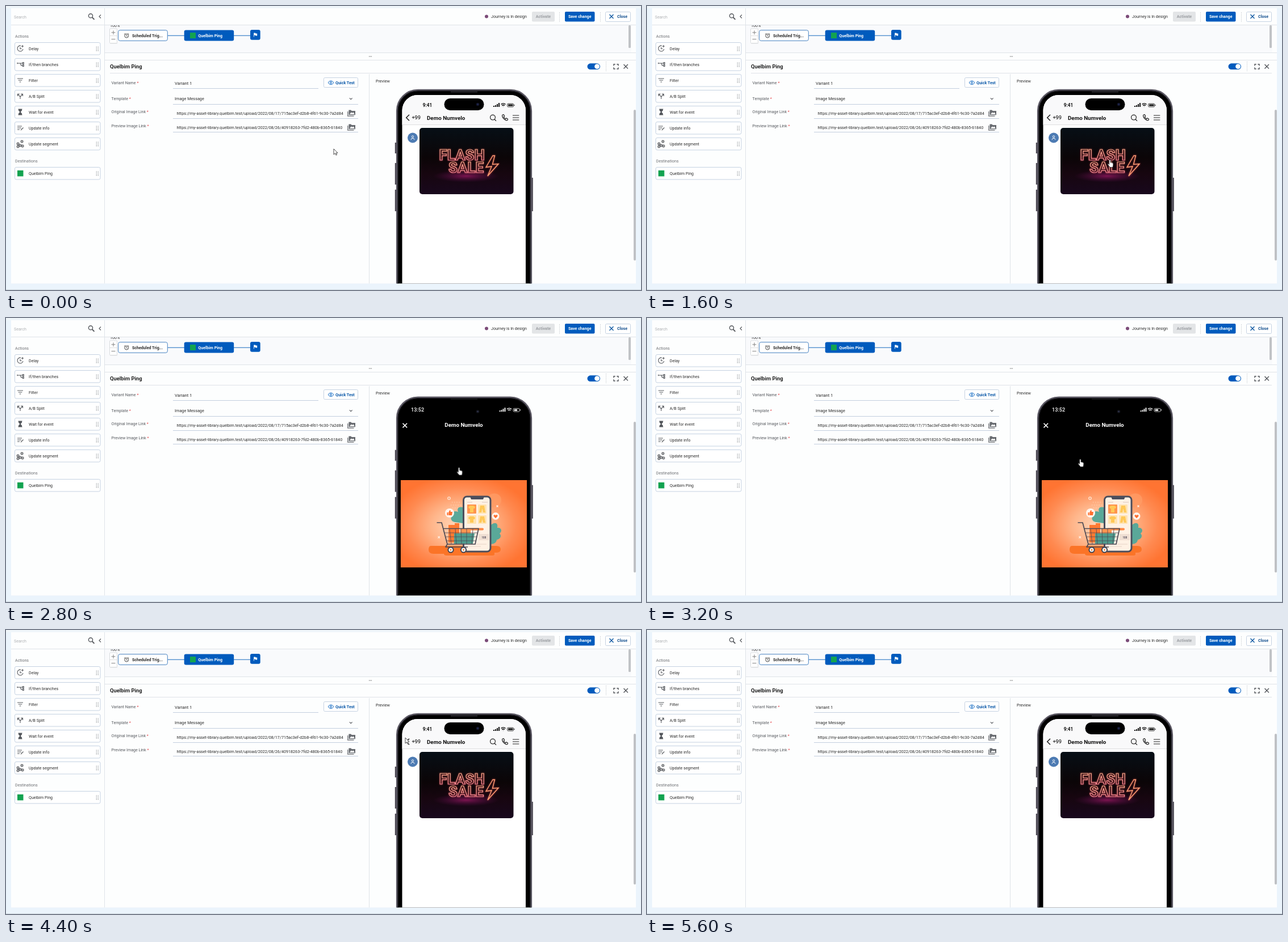
Recreate the animation shown at these times as an HTML page. Size 1118 px wide and 501 px high, loop 6 s.

```html
<!DOCTYPE html>
<html lang="en">
<head>
<meta charset="utf-8">
<title>Journey editor</title>
<style>
html, body { margin: 0; width: 100%; height: 100%; overflow: hidden; background: #ebf4fc; }
svg { display: block; width: 1118px; height: 501px; }
text { font: 7.1px Roboto, sans-serif; fill: #2b2b2b; white-space: pre; }
.b { font-weight: 700; }
.w { fill: #fff; }
.mute { fill: #6d6f73; }
.lab { fill: #56595e; }
.req { fill: #e5484d; }
.url { font-size: 7.2px; }
.title { font-size: 9.4px; font-weight: 700; fill: #222; }
.name { font-size: 9.8px; font-weight: 700; fill: #111; }
.line { fill: none; stroke: #dfe3e8; }
.field { fill: none; stroke: #c3cedf; }
.ico { fill: none; stroke: #55585d; stroke-width: 1.1; }
.box { fill: #fff; stroke: #c5d2e2; }
.blue { fill: #005bbd; }
.sep { stroke: #b9bdc3; stroke-dasharray: 1 1.6; }
.neon { font-size: 26px; font-weight: 700; fill: none; stroke: url(#neon); stroke-width: 1.2; }
.glow { filter: drop-shadow(0 0 1.5px #c8434a); }

.chat { animation: chat 6s step-end infinite; }
.viewer { animation: viewer 6s step-end infinite; }
.cursor { animation: move 6s infinite; }
.arrow { animation: arrow 6s step-end infinite; }
.hand { animation: hand 6s step-end infinite; }
@keyframes chat { 0%, 73.33% { visibility: visible } 33.33% { visibility: hidden } }
@keyframes viewer { 0%, 73.33% { visibility: hidden } 33.33% { visibility: visible } }
@keyframes arrow { 0%, 73.33% { visibility: visible } 13.33%, 93.33% { visibility: hidden } }
@keyframes hand { 0%, 73.33% { visibility: hidden } 13.33% { visibility: visible } }
@keyframes move {
  0% { transform: translate(577px, 252px); animation-timing-function: steps(6) }
  19.99% { transform: translate(811px, 270px); animation-timing-function: steps(2) }
  26.66%, 43.33% { transform: translate(815px, 271px); animation-timing-function: steps(3) }
  53.33% { transform: translate(763px, 249px); animation-timing-function: steps(3) }
  63.33% { transform: translate(703px, 191px); animation-timing-function: step-end }
  66.66% { transform: translate(703px, 190px); animation-timing-function: step-end }
  73.33% { transform: translate(703px, 190px); animation-timing-function: steps(5) }
  89.99%, 100% { transform: translate(604px, 232px) }
}
</style>
</head>
<body>
<svg viewBox="0 0 1118 501">
<defs>
  <linearGradient id="neon" x1="0" y1="0" x2="0" y2="1">
    <stop offset="0" stop-color="#ffc08e"/><stop offset="1" stop-color="#ff7f9c"/>
  </linearGradient>
  <linearGradient id="night" x1="0" y1="0" x2="0" y2="1">
    <stop offset="0" stop-color="#070f16"/><stop offset=".45" stop-color="#0b0507"/>
    <stop offset=".7" stop-color="#170610"/><stop offset="1" stop-color="#18081d"/>
  </linearGradient>
  <radialGradient id="floor">
    <stop offset="0" stop-color="#7d1450"/><stop offset="1" stop-color="#4a0c40" stop-opacity="0"/>
  </radialGradient>
  <radialGradient id="sun" cx=".48" cy=".52" r=".58">
    <stop offset="0" stop-color="#ffdcc2"/><stop offset=".4" stop-color="#ffb68b"/>
    <stop offset=".75" stop-color="#ff8a51"/><stop offset="1" stop-color="#ff7432"/>
  </radialGradient>
  <clipPath id="page"><rect x="640" y="120" width="460" height="369.5"/></clipPath>
  <clipPath id="strip"><rect x="174" y="34" width="927" height="48"/></clipPath>
  <clipPath id="url"><rect x="296" y="180" width="301.5" height="42"/></clipPath>
  <g id="shell">
    <path d="M686 241v19M686 277v38M686 324v38M926.6 303v59" stroke="#4c4953" stroke-width="2.4"/>
    <rect x="688.2" y="148" width="236.6" height="420" rx="37" stroke="#5b5863" stroke-width="2.6"/>
    <rect x="690.4" y="150.2" width="232.2" height="416" rx="35" fill="none" stroke="#1d1c22"/>
  </g>
  <g id="status">
    <path d="M1 3V1M4 3V0M7 3V-2M10 3V-4" stroke="currentColor" stroke-width="2"/>
    <path d="M13.5 -1.5a6 6 0 0 1 8 0M15.2 .7a3.4 3.4 0 0 1 4.6 0M17.5 2.6v.3" fill="none" stroke="currentColor" stroke-width="1.5"/>
    <rect x="24.6" y="-2.8" width="11" height="5.8" rx="1.6" fill="none" stroke="currentColor" stroke-width=".8"/>
    <path d="M37 -1v2" stroke="currentColor"/>
  </g>
  <g id="media">
    <path d="M-6.3 -3V5.2H4.5" fill="none" stroke="#686b70" stroke-width="1.2"/>
    <path d="M-4.6 -5.5h4l1.2 1.4H7V3.2H-4.6Z" fill="#686b70"/>
    <path d="M-3 2 0 -1.7 1.6 .2 3.2 -1.8 5.8 2Z" fill="#fff"/>
  </g>
</defs>

<rect width="1118" height="4" fill="#f0f6fa"/>
<rect x="9" y="4" width="1100" height="485.5" fill="#fdfefe"/>
<path d="M0 500.5H1118" stroke="#cfd9df"/>
<path class="line" d="M9 33.5H1109M173.5 4V489.5"/>

<text x="14" y="21.5" style="fill:#aeb0b3">Search</text>
<g class="ico">
  <circle cx="149" cy="17.3" r="3.6" stroke-width="1.4"/><path d="M151.7 20 155.5 23.8" stroke-width="1.8"/>
  <path d="M167 15.5 164 18.5 167 21.5"/>
</g>
<text class="mute" x="16" y="55.5">Actions</text>
<text class="mute" x="16" y="275.5">Destinations</text>
<g id="list"></g>

<!-- top bar -->
<circle cx="846" cy="18.5" r="3" fill="#7b4b78"/>
<text x="854" y="21.3">Journey is In design</text>
<rect x="926" y="10" width="40" height="17.5" rx="2" fill="#e3e5e7"/>
<text class="b" x="946" y="21.3" text-anchor="middle" style="fill:#9b9ea2">Activate</text>
<path class="sep" d="M974.5 11V28M1046.5 11V28M1056.5 98V115"/>
<rect class="blue" x="984" y="10" width="52.5" height="17.5" rx="2"/>
<text class="b w" x="1010.2" y="21.3" text-anchor="middle">Save change</text>
<rect class="box" x="1055.5" y="10.5" width="44" height="17" rx="2"/>
<path d="M1062.5 15l7 7M1069.5 15l-7 7" stroke="#00529f" stroke-width="1.3"/>
<text class="b" x="1076" y="21.3" style="fill:#14508f">Close</text>

<!-- flow strip -->
<rect x="174" y="34" width="927" height="48" fill="#f9fafc"/>
<g clip-path="url(#strip)"><text x="183" y="37.3">100%</text></g>
<rect x="183" y="40.5" width="13" height="26" rx="1" fill="#ddd"/>
<rect x="182.5" y="40" width="13" height="25.5" rx="1" fill="#fff" stroke="#d9dcdf"/>
<path d="M185.5 46.8h7M189 43.3v7M185.5 58.5h7" stroke="#777" stroke-width=".9"/>
<path d="M183 52.5h12" stroke="#ddd"/>
<path d="M285 52.2H430" stroke="#1567bd"/>
<rect x="197.7" y="42.7" width="86.6" height="18.6" rx="3" fill="#fff" stroke="#4581c0"/>
<g class="ico" style="stroke:#333;stroke-width:.9">
  <circle cx="212.3" cy="52.6" r="3.4"/>
  <path d="M212.3 50.5v2.3l1.4 .8M208.2 50l2-1.9M216.4 50l-2-1.9"/>
</g>
<text class="b" x="222" y="54.8">Scheduled Trig...</text>
<rect class="blue" x="313.7" y="42.4" width="87.5" height="19.2" rx="3"/>
<rect x="324" y="47" width="10" height="10" fill="#13a350"/>
<text class="b w" x="338.3" y="54.8">Quelbim Ping</text>
<rect class="blue" x="430" y="42" width="17.7" height="17.7" rx="3"/>
<path d="M436.2 47.4h2.9l.5 1h2.6v4h-2.7l-.5-1h-2v3h-.8Z" fill="#fff"/>
<rect x="1096" y="34" width="4" height="40" rx="1.5" fill="#c1c3c6"/>

<!-- panel -->
<path class="line" d="M174 82.5H1109M174 95.5H1109M183 118.5H1100M639.5 120V489.5"/>
<path d="M639 89h5" stroke="#555" stroke-width="1.2" stroke-dasharray="1.2 .8"/>
<text class="title" x="183" y="110.2">Quelbim Ping</text>
<rect class="blue" x="1023.5" y="101.3" width="22.5" height="10.8" rx="5.4"/>
<circle cx="1040.6" cy="106.7" r="4.4" fill="#fff"/>
<g class="ico" style="stroke-width:1.4">
  <path d="M1070 105.5v-2.7h2.7M1075.3 102.8h2.7v2.7M1078 108.3v2.7h-2.7M1072.7 111h-2.7v-2.7"/>
  <path d="M1087.5 103l7.4 7.4M1094.9 103l-7.4 7.4"/>
</g>
<rect x="1105" y="183" width="4" height="266" rx="2" fill="#bfc1c5"/>

<text class="lab" x="185.5" y="138.2">Variant Name <tspan class="req">*</tspan></text>
<text class="lab" x="185.5" y="166.2">Template <tspan class="req">*</tspan></text>
<text class="lab" x="185.5" y="189.2">Original Image Link <tspan class="req">*</tspan></text>
<text class="lab" x="185.5" y="214.2">Preview Image Link <tspan class="req">*</tspan></text>
<path class="field" d="M294 145.5H550M294 173.5H620M294 198.5H620M294 222.5H620"/>
<text x="297" y="138.7" style="font-size:7.7px">Variant 1</text>
<text x="297" y="166.2" style="font-size:7.3px">Image Message</text>
<path class="ico" d="M604.8 162.3l2.4 2.4 2.4-2.4"/>
<g clip-path="url(#url)">
  <text class="url" x="300.5" y="191.5">https://my-asset-library.quelbim.test/upload/2022/08/17/715ac3ef-d2b8-4f61-9c30-7a2d84</text>
  <text class="url" x="300.5" y="216.5">https://my-asset-library.quelbim.test/upload/2022/08/26/40918263-7fd2-480b-8365-61840</text>
</g>
<use href="#media" x="608" y="189"/>
<use href="#media" x="608" y="214"/>
<rect class="box" x="559.5" y="126.5" width="60" height="17" rx="2"/>
<g fill="none" stroke="#005fc0">
  <path d="M567 135.3q5-6.6 10 0q-5 6.6-10 0Z"/><circle cx="572" cy="135.3" r="1.4"/>
</g>
<text class="b" x="580" y="138" style="fill:#0a58a8">Quick Test</text>
<text x="651" y="134.5">Preview</text>

<!-- chat screen -->
<g clip-path="url(#page)"><g class="chat">
  <use href="#shell"/>
  <path d="M783 151.5h47" stroke="#333238" stroke-width="1.5"/>
  <rect x="697.5" y="157" width="217.5" height="400" rx="27" fill="#fff"/>
  <path d="M697.5 209V184a27 27 0 0 1 27-27h163.5a27 27 0 0 1 27 27V209Z" fill="#f9f9fa"/>
  <path d="M697.5 209.5H915" stroke="#dedee0"/>
  <rect x="771.5" y="163" width="70" height="21" rx="10.5"/>
  <circle cx="830.5" cy="173.5" r="2.8" fill="#12152b"/><circle cx="830.5" cy="173.5" r="1" fill="#2b3568"/>
  <text class="b" x="733.8" y="177.7" style="font-size:8.2px;fill:#111">9:41</text>
  <g color="#111"><use href="#status" x="858" y="175"/></g>
  <rect x="884" y="173.6" width="8.5" height="3" rx=".8" fill="#111"/>
  <path d="M710 191.8 704.8 197 710 202.2" fill="none" stroke="#222" stroke-width="1.6"/>
  <text x="714.5" y="200.3" style="font-size:9.2px;font-weight:500">+99</text>
  <text class="name" x="741" y="200.6">Demo Numvelo</text>
  <g fill="none" stroke="#222" stroke-width="1.2">
    <circle cx="857" cy="196.6" r="4.4"/><path d="M860.2 200l2.8 2.9M892 193h11.3M892 197h11.3M892 201h11.3"/>
    <path d="M874.2 192l2-.6 1.5 3-1.3 1.3q1 2.2 3.2 3.4l1.4-1.3 2.5 1.5-.4 2q-1.2 1.2-3.8-.2-4.2-2.3-5.6-6.6-.4-1.6 .5-2.5Z"/>
  </g>
  <circle cx="716" cy="232.5" r="9" fill="#4d7bb3"/>
  <g fill="none" stroke="#fff" stroke-width=".9"><circle cx="716" cy="230.5" r="1.7"/><path d="M712.9 236q.3-2.7 3.1-2.7t3.1 2.7"/></g>
  <rect x="728" y="215" width="165.5" height="117" rx="5" fill="url(#night)"/>
  <ellipse cx="810" cy="300" rx="58" ry="11" fill="url(#floor)"/>
  <g class="glow">
    <text class="neon" x="762.5" y="271.6">FLASH</text>
    <text class="neon" x="779" y="293.5">SALE</text>
    <path d="M857 264 845 284.5 855 283 848 300 867 278.5 856.5 279.5 860.5 264Z" fill="none" stroke="#ffa074" stroke-width="1.4"/>
  </g>
</g>

<!-- image viewer -->
<g class="viewer">
  <use href="#shell" y="-8.3"/>
  <path d="M783 143h47" stroke="#29282d" stroke-width="1.2"/>
  <circle cx="830.5" cy="165" r="2.8" fill="#15171f"/><circle cx="830.5" cy="165" r="1" fill="#3b4160"/>
  <text class="w" x="713" y="165.4" style="font-size:9.1px;font-weight:500">13:52</text>
  <g color="#eee"><use href="#status" x="868.5" y="162.3"/></g>
  <rect x="894.6" y="160.9" width="5.5" height="3" fill="#eee"/>
  <path d="M698.5 185.8l7.6 7.6M706.1 185.8l-7.6 7.6" stroke="#fff" stroke-width="1.6"/>
  <text class="name" x="806" y="192.4" text-anchor="middle" style="fill:#fff">Demo Numvelo</text>
  <rect x="695" y="286" width="222" height="154" fill="url(#sun)"/>
  <path d="M846 323c2-18 25-17 26-3 1 10-8 14-18 14Z" fill="#ff9d66" opacity=".75"/>
  <path d="M748 402h62q4-5 9 0h44q8 0 8 6t-9 6h-2v3q0 2-5 2h-79q-5 0-5-3h-18q-9 0-9-7t4-7Z" fill="#fb7427"/>
  <g fill="#5aa899">
    <path d="M804 334c-9-2-10 4-8 8-9-3-13 2-9 7-6 2-4 10 3 11l14 2Z"/>
    <path d="M853 366c7-7 14-5 12 4 8-1 9 7 4 10 5 5 0 11-5 11 0 5-5 8-11 8Z"/>
  </g>
  <rect x="805.5" y="315" width="47.5" height="97" rx="6" fill="#fff1e4" stroke="#4b4e5c" stroke-width="3"/>
  <path d="M817 315h25l-2 5h-21Z" fill="#4b4e5c"/>
  <path d="M812 325h9M838 325h10" stroke="#d9c8bc"/>
  <g fill="#ffc857">
    <rect x="812" y="329" width="16" height="16" rx="1" fill="#ff944d"/>
    <g fill="#ffe3b0">
      <rect x="831" y="329" width="15" height="16" rx="1"/>
      <rect x="812" y="348" width="16" height="15" rx="1"/>
      <rect x="831" y="348" width="15" height="15" rx="1"/>
    </g>
    <path d="M814 333l3-2h6l3 2-1 3h-2v7h-6v-7h-2ZM814 352l3-2h6l3 2-1 3h-2v6h-6v-6h-2ZM835 331h7l2 12h-4l-1.5-7-1.5 7h-4ZM835 350h7l2 11h-4l-1.5-6-1.5 6h-4Z"/>
  </g>
  <path d="M812 372.5h27" stroke="#ff8845" stroke-width="4" stroke-linecap="round"/>
  <rect x="832" y="381" width="18" height="11" fill="#f0dfd3"/>
  <text class="b" x="837.5" y="388.5" style="font-size:4.5px;fill:#5a5260">108</text>
  <path d="M812 399h34M812 403h24" stroke="#e5d3c6"/>
  <path d="M779 365h11v-3h8v34h-19Z" fill="#ff7a32"/>
  <path d="M789 380h36l-3 18h-33Z" fill="#4f9c8d"/>
  <rect x="800" y="372" width="18" height="8" fill="#ff9550"/>
  <g fill="none" stroke="#4a4a55" stroke-linejoin="round">
    <path d="M758.5 361h8.5l10 38h49l6-27.5H770M777 399l-3 5h39" stroke-width="1.7"/>
    <path d="M772 379h58M774 386h55M776 393h52M781 372l3 27M791 372l2 27M801 372l1 27M811 372v27M822 372l-2 27" stroke-width=".8"/>
  </g>
  <g fill="#fff" stroke="#43434f" stroke-width="2"><circle cx="783" cy="409" r="4.6"/><circle cx="805.5" cy="409" r="4.6"/></g>
  <g fill="#fb7427"><circle cx="783" cy="409" r="1.5"/><circle cx="805.5" cy="409" r="1.5"/></g>
  <circle cx="781" cy="344" r="8" fill="#fff5ed"/>
  <path d="M776.5 343h2v5h-2ZM779.3 343l2-4q2 0 1.2 3h3.5l-1 6h-5.7Z" fill="#ff6d2c"/>
  <circle cx="862" cy="349.5" r="6.5" fill="#fff5ed"/>
  <path d="M862 353.2l-3.3-3.4q-.8-2.6 1.5-2.6 1.2 0 1.8 1.2 .6-1.2 1.8-1.2 2.3 0 1.5 2.6Z" fill="#ff6d2c"/>
  <g fill="none" stroke="#fff1e6" stroke-width="1.1">
    <circle cx="780" cy="318" r="2.2"/>
    <path d="M760.5 385l3.5 3.5M764 385l-3.5 3.5M863.5 330.5l3 3M866.5 330.5l-3 3"/>
  </g>
  <path d="M785 325h17M783 330h18M786 335h12" stroke="#ffd9bd" stroke-dasharray="1.2 3"/>
</g></g>

<g class="cursor" fill="#fff" stroke="#222" stroke-width=".8" stroke-linejoin="round">
  <path class="arrow" d="M0 0V10L2.5 7.8 4 11.2 5.6 10.4 4.1 7.2H7Z"/>
  <path class="hand" d="M-1.3 1.2a1.2 1.2 0 0 1 2.4 0V5.2c.5-.5 1.6-.4 1.8 .3 .6-.4 1.5-.1 1.6 .6 .7-.3 1.3 .2 1.3 1V9.8c0 1.5-.7 2.2-.8 3.8H0C-.2 12.2-2 11.2-3.6 8.6c-.5-1 .6-1.7 1.4-1l.9 1Z"/>
</g>
</svg>
<script>
const rows = [
  ["Delay", "M1-5A5 5 0 1 0 5 1M0-2.5V.5H2.5M2-4H6M4-6V-2"],
  ["If/then branches", "M-5.5-2H4M-1-2Q1-2 1 0T3 2H4M-5-3.2v2.4M4.3-3.5h2v2.6h-2ZM4.3 .8h2v2.6h-2Z"],
  ["Filter", "M-5-3H5M-3.3 0H3.3M-1.3 3H1.3"],
  ["A/B Split", "M0 5V1L-4-3M0 1 4-3M-4.5 0V-3.7H-1M4.5 0V-3.7H1"],
  ["Wait for event", "M-3.5-5H3.5M-3.5 5H3.5M-2.5-5v2L0 0l2.5-3v-2ZM-2.5 5V3L0 0l2.5 3v2Z", "#55585d"],
  ["Update info", "M-5-3H3M-5 0H2M-5 3H-1M1 4 5.5-.5"],
  ["Update segment", "M-4-2a2 2 0 1 0 .1 0M0 1a2 2 0 1 0 .1 0M-4 3a2 2 0 1 0 .1 0M4 2a2 2 0 1 0 .1 0M3-6a2 2 0 1 0 .1 0", "#bbb"],
  ["Quelbim Ping"]
];

const row = ([label, icon, fill = "none"], i) => {
  const y = icon ? 75 + 28 * i : 295;
  const mark = icon
    ? `<path class="ico" d="${icon}" transform="translate(25 ${y})" style="fill:${fill}"/>`
    : `<rect x="20" y="${y - 5}" width="10.5" height="10.5" fill="#13a350"/>`;
  return `<rect class="box" x="15.5" y="${y - 10.5}" width="150.5" height="21.5" rx="2.5"/>${mark}
    <text x="40" y="${y + 2.5}">${label}</text>
    <path d="M159.3 ${y - 3.5}v8M162.3 ${y - 3.5}v8" stroke="#a2a6ab" stroke-width="1.3" stroke-dasharray="1.3 .9"/>`;
};
document.getElementById("list").innerHTML = rows.map(row).join("");
</script>
</body>
</html>
```
